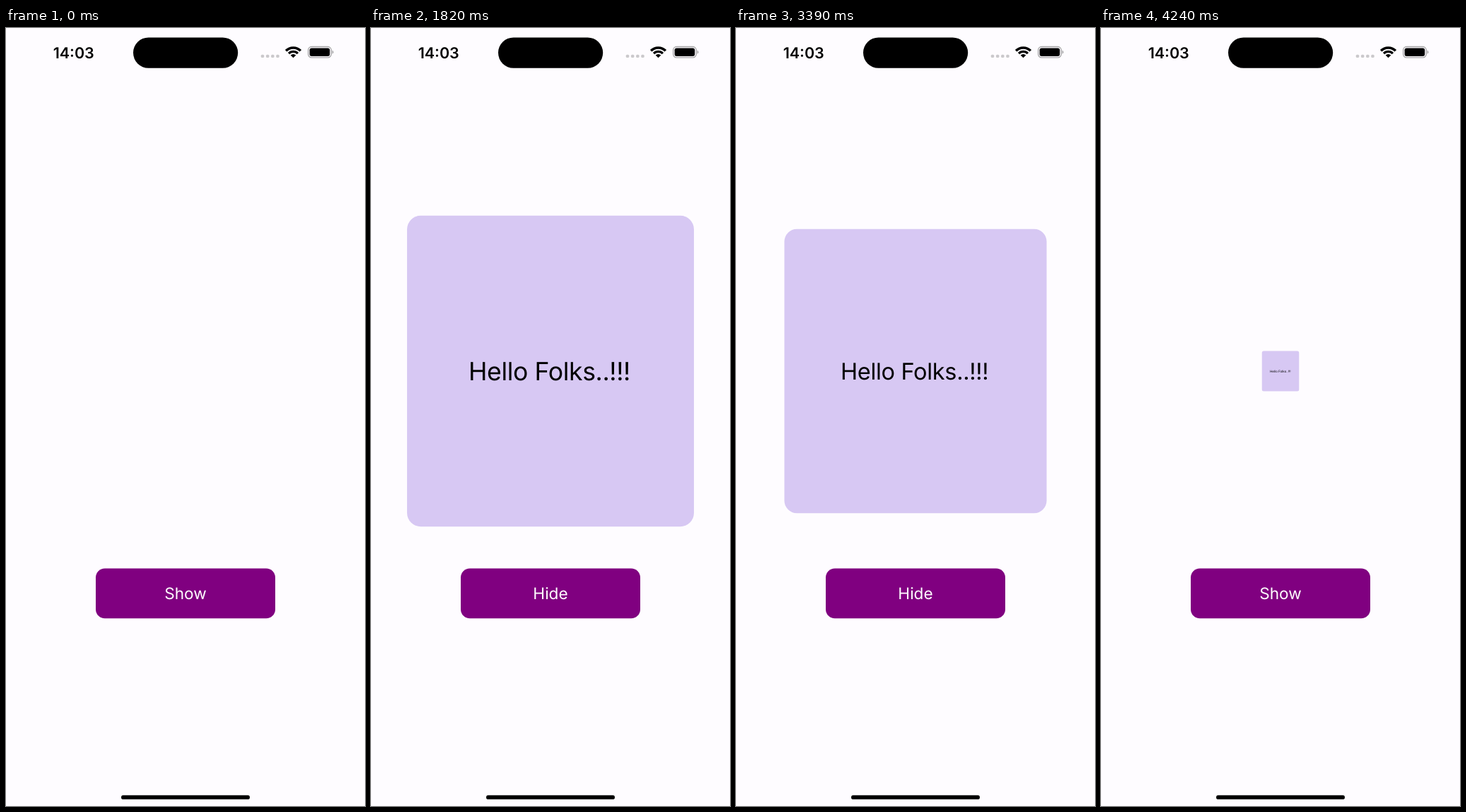
An HTML page that plays this animation: 508x1102 px, repeating every 4270 ms.

```html
<!DOCTYPE html>
<html lang="en">
<head>
<meta charset="utf-8">
<title>Show and hide card</title>
<style>
  html, body { margin: 0; width: 100%; height: 100%; overflow: hidden; background: #fefcff; }
  svg { display: block; width: 100%; height: 100%; }
  text { font-family: Inter, "Liberation Sans", sans-serif; text-rendering: geometricPrecision; }
</style>
</head>
<body>
<svg viewBox="0 0 508 1102">
  <rect width="508" height="1102" fill="#fefcff"/>

  <!-- status bar -->
  <text x="95.7" y="42.6" font-size="21.5" font-weight="600" text-anchor="middle">14:03</text>
  <rect x="180" y="13.4" width="148.2" height="43.4" rx="21.7"/>
  <g id="dots" fill="#cbc9cc"></g>
  <g id="wifi" fill="none" stroke="#000"></g>
  <rect x="427.6" y="26.5" width="32.6" height="15.4" rx="4.8" fill="none" stroke="#a5a4a6" stroke-width="1.3"/>
  <rect x="429.6" y="28.4" width="28.6" height="11.6" rx="2.9"/>
  <path d="M461.6 31.6q1.8 .8 1.8 2.6t-1.8 2.6z" fill="#a5a4a6"/>

  <g id="card">
    <rect x="-203.2" y="-220.4" width="406.4" height="440.8" rx="19.4" fill="#d7c8f3"/>
    <text x="-116.1" y="13.4" font-size="35.6" letter-spacing="-.35">Hello Folks..!!!</text>
  </g>

  <rect x="127" y="765.5" width="254" height="70.8" rx="12.9" fill="#800080"/>
  <text id="label" x="254" y="809.3" font-size="22.6" text-anchor="middle" fill="#fff">Show</text>

  <!-- home indicator -->
  <rect x="163" y="1086.8" width="182" height="5.8" rx="2.9"/>
</svg>
<script>
const LOOP = 4270;
const TICK = 1000 / 60;
const HIDE_MS = 200;
const TAPS = [
  { at: 1160, start: 1160, show: true },
  { at: 2205, start: 2224, show: false },
  { at: 3200, start: 3205, show: true },
  { at: 4070, start: 4085.5, show: false }
];

const $ = id => document.getElementById(id);
const card = $("card"), label = $("label");

function add(parent, tag, attrs) {
  const el = document.createElementNS("http://www.w3.org/2000/svg", tag);
  for (const key in attrs) el.setAttribute(key, attrs[key]);
  parent.appendChild(el);
}

function drawStatusIcons() {
  for (let i = 0; i < 4; i++) {
    add($("dots"), "rect", { x: 360.8 + i * 7.15, y: 37.7, width: 4.4, height: 4.4, rx: 1.5 });
  }
  // concentric arcs opening upward; the last one is a filled sector
  const cx = 406.5, cy = 42.3, angle = 46 * Math.PI / 180;
  for (const [r, width] of [[14.4, 3.5], [8.9, 3.3], [2.65, 5.3]]) {
    const dx = r * Math.sin(angle), y = cy - r * Math.cos(angle);
    add($("wifi"), "path", {
      d: `M${cx - dx} ${y}A${r} ${r} 0 0 1 ${cx + dx} ${y}`,
      "stroke-width": width
    });
  }
}

// Underdamped spring from 0 to 1, stepped at the display rate.
function spring(ms) {
  const stiffness = 230.2, decay = 11;
  const t = Math.floor(ms / TICK) * TICK / 1000;
  const w = Math.sqrt(stiffness - decay * decay);
  return 1 - Math.exp(-decay * t) * (Math.cos(w * t) + decay / w * Math.sin(w * t));
}

// cubic-bezier(.42, 0, 1, 1)
function easeIn(x) {
  let lo = 0, hi = 1;
  for (let i = 0; i < 24; i++) {
    const s = (lo + hi) / 2, q = 1 - s;
    if (1.26 * q * q * s + 3 * q * s * s + s * s * s < x) lo = s; else hi = s;
  }
  return lo * lo * (3 - 2 * lo);
}

const easeInOut = p => p < 0.5 ? easeIn(2 * p) / 2 : 1 - easeIn(2 - 2 * p) / 2;

function cardScale(tap, time) {
  if (!tap) return 0;
  const ms = Math.max(0, time - tap.start);
  return tap.show ? spring(ms) : 1 - easeInOut(Math.min(1, ms / HIDE_MS));
}

function render(time) {
  const tap = TAPS.filter(t => t.at <= time).pop();
  const scale = cardScale(tap, time);
  label.textContent = tap && tap.show ? "Hide" : "Show";
  card.setAttribute("display", scale > 0.002 ? "inline" : "none");
  card.setAttribute("transform", `translate(254 486) scale(${scale})`);
}

drawStatusIcons();
render(0);
const begin = performance.now();
function frame() {
  render((performance.now() - begin) % LOOP);
  requestAnimationFrame(frame);
}
requestAnimationFrame(frame);
</script>
</body>
</html>
```
